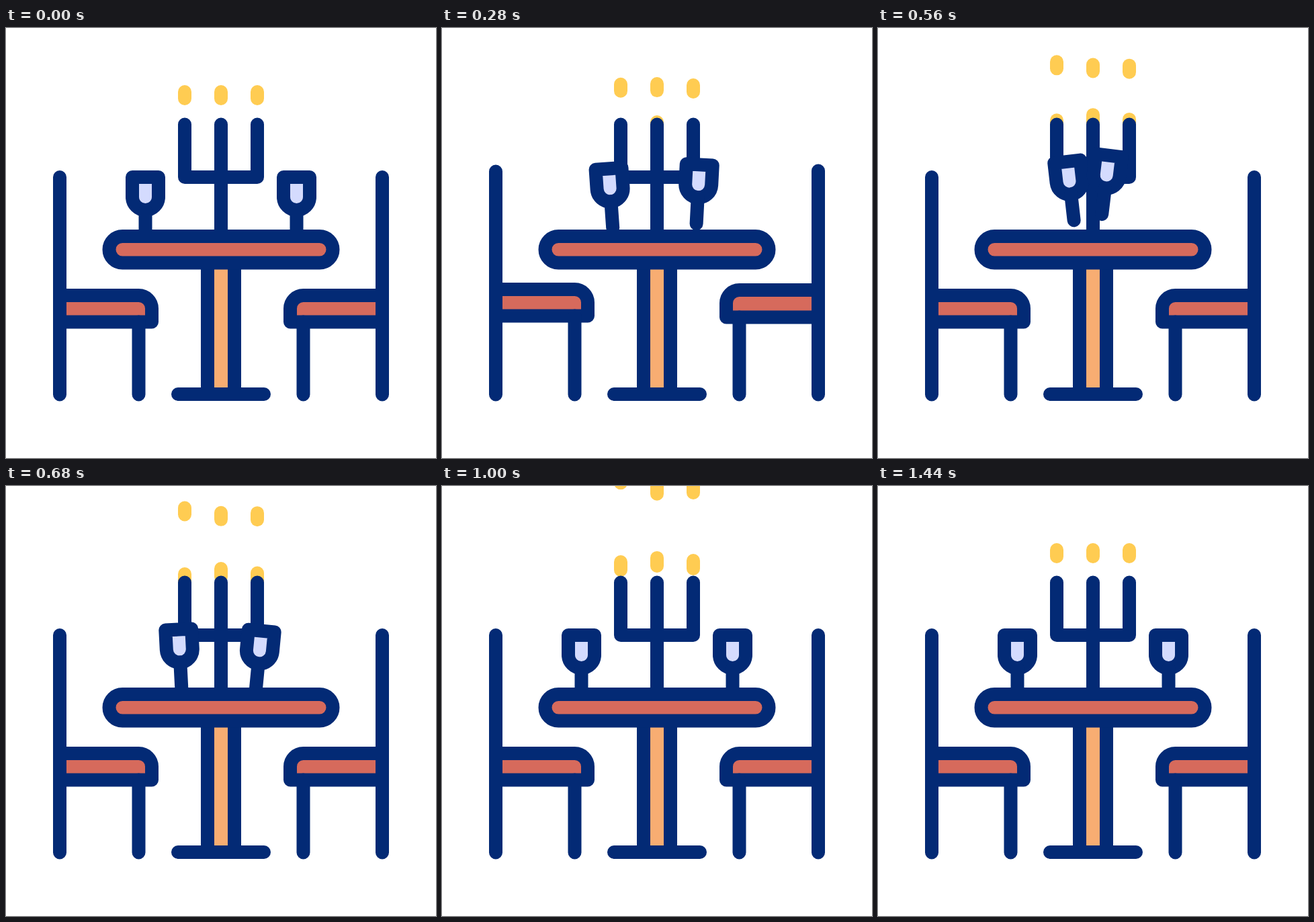
Recreate the animation shown at these times as an HTML page. Size 640 by 640 pixels, loop 1480 ms.

```html
<!DOCTYPE html>
<html lang="en">
<head>
<meta charset="utf-8">
<title>Dinner for two</title>
<style>
html, body { margin: 0; width: 100%; height: 100%; overflow: hidden; background: #fff; }
svg { display: block; width: 100vw; height: 100vh; }
.ink { fill: none; stroke: #032a75; stroke-width: 20; stroke-linecap: round; stroke-linejoin: round; }
.red { fill: #d66a5c; }
.wood { fill: #f8ad72; }
.wine { fill: #d4dbfe; }
.flame { fill: #ffcc52; }
</style>
</head>
<body>
<svg viewBox="0 0 640 640">
  <g id="flames"></g>
  <path class="ink" d="M266 143.5V222H374V143.5M320 143.5V310"/>
  <g id="glasses"></g>
  <path class="wood" d="M300 350H340V545H300Z"/>
  <path class="ink" d="M300 350V545M340 350V545M256 545H384"/>
  <rect class="ink red" x="153.5" y="310" width="333" height="39.5" rx="19.75"/>
  <g id="chairs"></g>
</svg>
<script>
const LOOP = 1480;

const make = (parent, tag, attrs) => {
  const el = document.createElementNS("http://www.w3.org/2000/svg", tag);
  for (const k in attrs) el.setAttribute(k, attrs[k]);
  return parent.appendChild(el);
};
const group = id => document.getElementById(id);

const smooth = (t, a, b) => {
  const u = Math.min(1, Math.max(0, (t - a) / (b - a)));
  return u * u * (3 - 2 * u);
};

// Monotone cubic curve through the points, at rest at both ends
function track(times, values) {
  const rate = times.slice(1).map((t, i) => (values[i + 1] - values[i]) / (t - times[i]));
  const slope = times.map((t, i) => {
    const a = rate[i - 1] || 0, b = rate[i] || 0;
    return a * b > 0 ? 2 * a * b / (a + b) : 0;
  });
  const last = times.length - 1;
  return t => {
    if (t <= times[0]) return values[0];
    if (t >= times[last]) return values[last];
    let i = 0;
    while (t >= times[i + 1]) i++;
    const h = times[i + 1] - times[i], u = (t - times[i]) / h, v = 1 - u;
    return v * v * (1 + 2 * u) * values[i] + u * u * (3 - 2 * u) * values[i + 1]
      + h * u * v * (v * slope[i] - u * slope[i + 1]);
  };
}

// Flames: one floats off while the next climbs out of its candle
const climb = [0, 440, 680, 840, 1160, 1440];
const flames = [
  { x: 266, from: 40, to: 1440, rise: 143, next: [142, 132.5, 121, 112, 95, 85] },
  { x: 320, from: 0, to: 1440, rise: 120, next: [136, 124.5, 113, 105, 90.5, 85] },
  { x: 374, from: 40, to: 1400, rise: 120, next: [140, 131, 119.5, 110, 93.5, 85] }
].map(f => {
  const shape = () => make(group("flames"), "rect",
    { class: "flame", x: f.x - 10, y: 85, width: 20, height: 30, rx: 10 });
  const old = shape(), fresh = shape(), top = track(climb, f.next);
  return t => {
    old.setAttribute("y", 85 - f.rise * smooth(t, f.from, f.to));
    fresh.setAttribute("y", top(t));
    fresh.setAttribute("height", 32 - 2 * smooth(t, 1100, 1440));
  };
});

// Glasses: lift, clink, return; the pivot is the middle of the rim
const swing = [80, 280, 440, 480, 680, 840, 880];
const glasses = [
  { x: 207.5, dx: [0, 41, 81, 83, 50, 2.5, 0], dy: [0, -12.5, -28.5, -29.5, -8.5, -1, 0],
    tilt: [0, -4, -7.7, -7.9, -3, -0.3, 0] },
  { x: 432.5, dx: [0, -49.5, -99, -102, -53.5, -2.5, 0], dy: [0, -18.5, -43.5, -45, -6.5, -1, 0],
    tilt: [0, 3, 7, 7.2, 5.5, 0.3, 0] }
].map(c => {
  const g = make(group("glasses"), "g", {});
  make(g, "path", { class: "ink wine", d: "M-19.5-10H19.5V19.5A19.5 19.5 0 0 1-19.5 19.5Z" });
  make(g, "path", { class: "ink", d: "M0 39V78" });
  const dx = track(swing, c.dx), dy = track(swing, c.dy), tilt = track(swing, c.tilt);
  return t => g.setAttribute("transform",
    `translate(${c.x + dx(t)} ${232 + dy(t)}) rotate(${tilt(t)})`);
});

// Chairs: hop, squash the cushion, settle
const hop = [0, 280, 440, 560];
const chairs = [
  { place: "", back: [0, -8.5, 0, 0], top: [0, -9, 8, 0], base: [0, -9, 1, 0] },
  { place: "matrix(-1 0 0 1 640 0)", back: [0, -9.5, 0, 0], top: [0, -8, 11, 0], base: [0, -7, 3, 0] }
].map(c => {
  const g = make(group("chairs"), "g", { transform: c.place });
  const seat = make(g, "path", { class: "ink red" });
  const legs = make(g, "path", { class: "ink" });
  const back = track(hop, c.back), top = track(hop, c.top), base = track(hop, c.base);
  return t => {
    const a = 398 + top(t), b = 437.5 + base(t);
    seat.setAttribute("d", `M80 ${a}H197.5A19.5 19.5 0 0 1 217 ${a + 19.5}V${b}H80Z`);
    legs.setAttribute("d", `M80 ${222 + back(t)}V545.5M197.5 ${b}V545.5`);
  };
});

const parts = [...flames, ...glasses, ...chairs];
function draw() {
  const t = performance.now() % LOOP;
  parts.forEach(move => move(t));
  requestAnimationFrame(draw);
}
draw();
</script>
</body>
</html>
```
